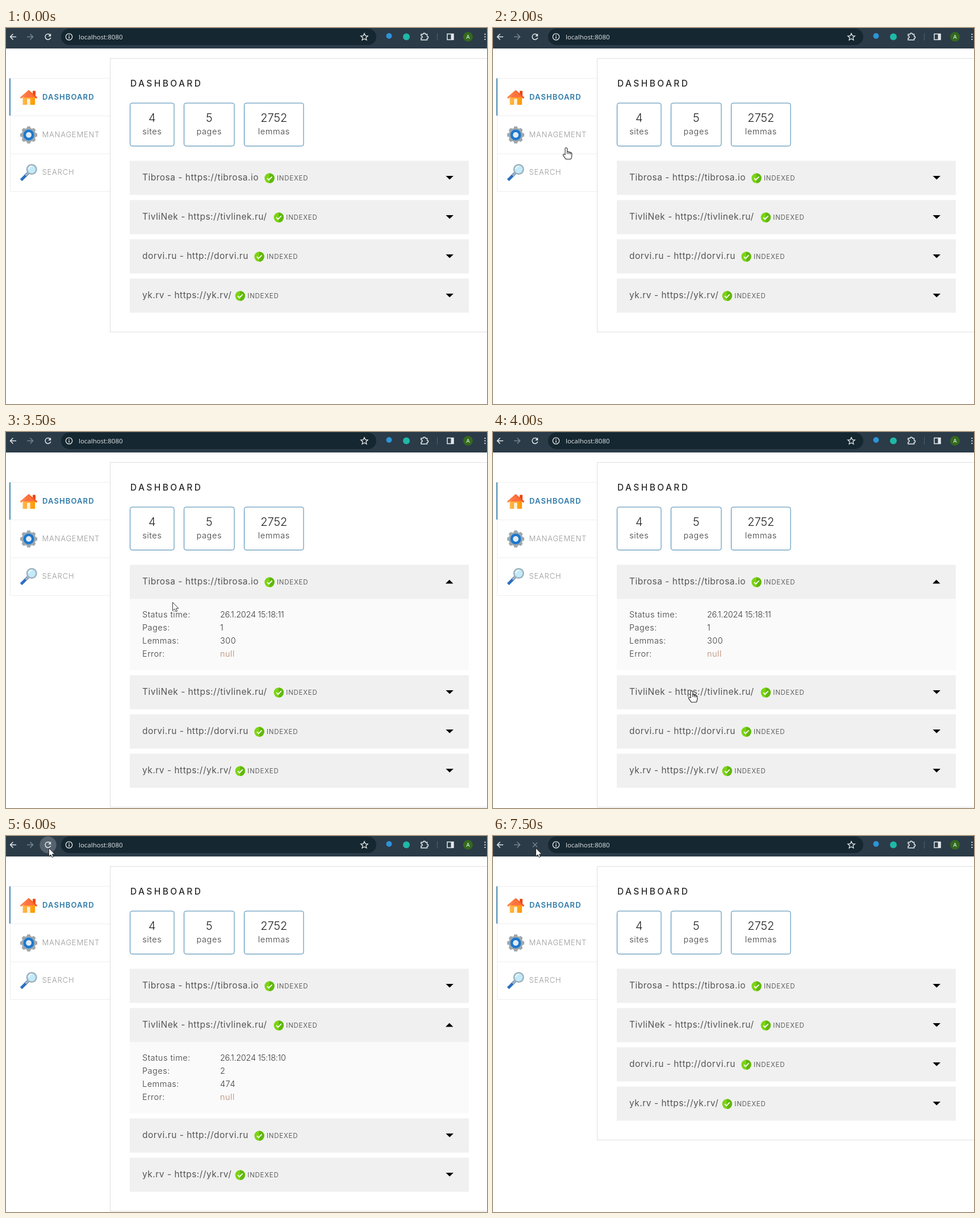
These frames come from a looping animation (847 by 661 pixels, 8 s). An HTML page:

```html
<!DOCTYPE html>
<html lang="en">
<head>
<meta charset="utf-8">
<title>Dashboard</title>
<style>
  html, body { margin: 0; width: 100%; height: 100%; overflow: hidden; background: #fff; }
  svg { display: block; width: 847px; height: 661px; }
  text { font-family: Inter, Lato, sans-serif; font-size: 14.5px; fill: #3c3c3c; white-space: pre; }
  .address { font: 11.5px "Open Sans", "Noto Sans", sans-serif; fill: #e4e8eb; }
  .nav { font-size: 13px; font-weight: 350; letter-spacing: .8px; fill: #999; }
  .nav.active { font-weight: 600; letter-spacing: 1.1px; fill: #2b79a8; }
  .heading { font-size: 15.5px; font-weight: 550; letter-spacing: 3.4px; fill: #2a2a2a; }
  .number { font-size: 20px; font-weight: 300; fill: #222; }
  .label { font-weight: 300; letter-spacing: .6px; }
  .site { font-size: 15.5px; font-weight: 400; letter-spacing: .5px; fill: #555; }
  .status { font-size: 11.5px; letter-spacing: .75px; fill: #606060; }
  .detail { font-weight: 300; letter-spacing: .5px; }
  .time { letter-spacing: -.3px; }
  .error { fill: #b5836a; }
  .line { fill: none; stroke: #e4e9ec; stroke-width: 1.5; }
</style>
</head>
<body>
<svg id="stage" viewBox="0 0 847 661">
  <defs>
    <linearGradient id="roof"><stop stop-color="#ff8a50"/><stop offset="1" stop-color="#f4511e"/></linearGradient>
    <linearGradient id="wall"><stop stop-color="#ffb74d"/><stop offset="1" stop-color="#ff9800"/></linearGradient>
    <g id="check">
      <circle r="8.7" fill="#7bd313"/>
      <path d="M0-8.7A8.7 8.7 0 0 1 0 8.7Z" fill="#61b80c"/>
      <path d="M-4.2.2L-1.2 3.2L4.4-2.6" fill="none" stroke="#fff" stroke-width="1.8"/>
    </g>
  </defs>
  <rect width="847" height="661" fill="#fff"/>

  <g id="toolbar">
    <rect width="847" height="36" fill="#2b3b48"/>
    <rect x="97" y="1" width="555" height="29" rx="14.5" fill="#152730"/>
    <path class="line" d="M18 15.5H7.5M12.5 10.5l-5 5l5 5"/>
    <path class="line" d="M37 15.5h10.5M42.5 10.5l5 5l-5 5" style="stroke:#768590"/>
    <circle id="hover" cx="74" cy="15.5" r="14.7" fill="#56636f"/>
    <g id="reload">
      <path class="line" d="M78 12.3a5 5 0 1 0 .8 4.7"/>
      <path d="M79.2 9.8v5h-5z" fill="#e4e9ec"/>
    </g>
    <path id="stop" class="line" d="M70 11.5l8 8m0-8l-8 8" style="stroke:#76838d"/>
    <circle class="line" cx="111" cy="15.5" r="5.7" style="stroke-width:1.3"/>
    <path class="line" d="M111 14.7v4M111 12v1.5"/>
    <text class="address" x="128" y="19.5">localhost:8080</text>
    <path class="line" style="stroke-width:1.3" d="M631 9.5l1.8 4.1l4.4.4l-3.3 2.9l1 4.3l-3.9-2.3l-3.9 2.3l1-4.3l-3.3-2.9l4.4-.4z"/>
    <circle cx="674.5" cy="14" r="5" fill="#2d94d8"/>
    <circle cx="705" cy="15.5" r="6" fill="#1fb8a6"/>
    <path class="line" d="M731 11h3.5a2 2 0 0 1 4 0h3v3.5a2 2 0 0 1 0 4V21h-10.5v-3.2a2 2 0 0 0 0-4z"/>
    <path d="M759.5 9v13" stroke="#53626f"/>
    <rect class="line" x="777" y="10.5" width="11" height="10"/>
    <path d="M783.5 10.5h4.5v10h-4.5z" fill="#e4e9ec"/>
    <circle cx="813.5" cy="15.5" r="8.5" fill="#33691e"/>
    <text x="813.5" y="19" text-anchor="middle" style="font-size:9.5px;fill:#fff">A</text>
    <path d="M842.5 10h2v2h-2zm0 4.5h2v2h-2zm0 4.5h2v2h-2z" fill="#e4e9ec"/>
  </g>

  <g id="sidebar">
    <path d="M183 88.5H7.5V287.5H183M7 154.5H183M7 221H183" fill="none" stroke="#eee"/>
    <rect x="6" y="88.5" width="1.7" height="65.5" fill="#2b79a3"/>
    <path d="M47 110.5h5v10h-5z" fill="#e64a19"/>
    <path d="M29.5 122L40 112L51 122V135H29.5z" fill="url(#wall)"/>
    <path d="M37 124.5h5.5v10.5h-5.5z" fill="#fff3e0"/>
    <path d="M40 109L55.3 122l-2 2.3L40 113.5L26.7 124.3l-2-2.3z" fill="url(#roof)"/>
    <path d="M40 113.5L50 122H30z" fill="#ff7043"/>
    <g id="gear" transform="translate(40 188)"></g>
    <path d="M39.5 254.5L26.5 267.5" stroke="#2c6fc4" stroke-width="5"/>
    <path d="M41 253l-6.5 6.5" stroke="#a8b4ba" stroke-width="3.5"/>
    <circle cx="45.2" cy="248.5" r="8.3" fill="#c4eafa" stroke="#9eb3bd" stroke-width="2.6"/>
    <path d="M40 248a5.5 5.5 0 0 1 5.5-5" fill="none" stroke="#f2fcff" stroke-width="2"/>
    <text class="nav active" x="64" y="126">DASHBOARD</text>
    <text class="nav" x="63.5" y="192">MANAGEMENT</text>
    <text class="nav" x="63.5" y="258">SEARCH</text>
  </g>

  <rect id="panel" x="183.5" y="53.5" width="680" fill="#fff" stroke="#dfdfdf"/>
  <text class="heading" x="219" y="102.5">DASHBOARD</text>
  <g id="stats"></g>
  <g id="sites"></g>

  <g id="details">
    <rect x="218" width="597" height="125" fill="#fafafa"/>
    <g id="fields"></g>
  </g>

  <path id="arrow" d="M0 0V14.5L3.4 11.4L5.7 16.4L8 15.4L5.9 10.6H10.3Z" fill="#fff" stroke="#222" stroke-width=".9" stroke-linejoin="round"/>
  <g id="hand" fill="#fff" stroke="#222" stroke-width="1.1" stroke-linejoin="round">
    <path d="M-2 12.5V1.8Q-2 0 -.2 0T1.7 1.8V7Q4 6.2 4.6 7.8Q6.8 7.2 7.4 8.7Q9.8 8.4 9.8 10.5V14.5Q9.6 17.5 8 20H-.8Q-3 16.8-5.2 13.8Q-6.2 11.6-4.6 11.2Q-3.2 11-2 12.5Z"/>
    <path d="M1.7 7v4M4.6 7.8v3.4M7.4 8.7v3" fill="none"/>
  </g>
</svg>
<script>
const $ = id => document.getElementById(id);
const show = (id, on) => $(id).setAttribute('visibility', on ? 'visible' : 'hidden');
const move = (id, x, y) => $(id).setAttribute('transform', `translate(${x} ${y})`);

const STEP = 500, LOOP = 8000;
const ROW_TOP = 233.5, ROW_PITCH = 69, ROW_HEIGHT = 60, DETAIL_HEIGHT = 125;

const stats = [
  [218.5, 77.5, '4', 'sites'],
  [313.5, 88.5, '5', 'pages'],
  [419.5, 104.5, '2752', 'lemmas'],
];
const sites = [
  { name: 'Tibrosa - https://tibrosa.io', badge: 464, info: ['26.1.2024 15:18:11', '1', '300', 'null'] },
  { name: 'TivliNek - https://tivlinek.ru/', badge: 480.3, info: ['26.1.2024 15:18:10', '2', '474', 'null'] },
  { name: 'dorvi.ru - http://dorvi.ru', badge: 446 },
  { name: 'yk.rv - https://yk.rv/', badge: 412.3 },
];
const labels = ['Status time:', 'Pages:', 'Lemmas:', 'Error:'];

// One pointer pose per step
const pointer = [
  null, null, ['arrow', 53, 488], ['arrow', 91, 476],
  ['hand', 129, 210.5], ['hand', 125, 185.5], ['hand', 280, 264], ['arrow', 293.5, 299.5],
  ['hand', 350, 455], ['arrow', 364.7, 457.8], ['arrow', 136, 91], ['arrow', 89, 40],
  ...Array(4).fill(['arrow', 75.5, 21.3]),
];

function build() {
  const teeth = Array.from({ length: 8 }, (_, i) =>
    `<rect x="-3.2" y="-15" width="6.4" height="8" rx="1.5" fill="#9ea8ad" transform="rotate(${i * 45})"/>`).join('');
  $('gear').innerHTML = teeth +
    `<circle r="12.5" fill="#9ea8ad"/><circle r="7.2" fill="#e3ecf1" stroke="#1c78cf" stroke-width="4.6"/>`;

  $('stats').innerHTML = stats.map(([x, w, value, label]) => `
    <rect x="${x}" y="132" width="${w}" height="75.5" rx="3.5" fill="#fff" stroke="#3f84ad"/>
    <text class="number" x="${x + w / 2}" y="164.5" text-anchor="middle">${value}</text>
    <text class="label" x="${x + w / 2}" y="187" text-anchor="middle">${label}</text>`).join('');

  $('sites').innerHTML = sites.map(({ name, badge }, i) => `
    <g id="row${i}">
      <rect x="218" width="597" height="${ROW_HEIGHT}" fill="#f0f0f0"/>
      <text class="site" x="240" y="34.5">${name}</text>
      <use href="#check" x="${badge}" y="30.5"/>
      <text class="status" x="${badge + 13}" y="34.5">INDEXED</text>
      <path id="toggle${i}"/>
    </g>`).join('');

  $('fields').innerHTML = labels.map((label, i) => {
    const y = 32 + i * 23.2;
    const kind = ['time', '', '', 'error'][i];
    return `<text class="detail" x="240" y="${y}">${label}</text>
      <text id="value${i}" class="detail ${kind}" x="377" y="${y}"></text>`;
  }).join('');
}

function draw(time) {
  const step = Math.floor(time % LOOP / STEP);
  const open = step < 7 || step > 14 ? -1 : step < 9 ? 0 : 1;
  const rowY = i => ROW_TOP + i * ROW_PITCH + (open >= 0 && i > open ? DETAIL_HEIGHT : 0);

  sites.forEach((_, i) => {
    move('row' + i, 0, rowY(i));
    $('toggle' + i).setAttribute('d', i === open ? 'M774 33H787.5L780.8 26.3Z' : 'M774.5 26.5H788L781.2 33Z');
  });
  $('panel').setAttribute('height', 481 + (open < 0 ? 0 : DETAIL_HEIGHT));

  $('details').setAttribute('display', open < 0 ? 'none' : 'inline');
  if (open >= 0) {
    move('details', 0, rowY(open) + ROW_HEIGHT);
    sites[open].info.forEach((value, i) => $('value' + i).textContent = value);
  }

  show('hover', step === 12 || step === 13);
  $('hover').setAttribute('fill', step === 13 ? '#6a7681' : '#56636f');
  show('reload', step < 14);
  show('stop', step >= 14);

  const [kind, x, y] = pointer[step] || [];
  for (const id of ['arrow', 'hand']) {
    show(id, id === kind);
    if (id === kind) move(id, x, y);
  }
}

build();
const start = performance.now();
function tick() {
  draw(performance.now() - start);
  requestAnimationFrame(tick);
}
tick();
</script>
</body>
</html>
```
